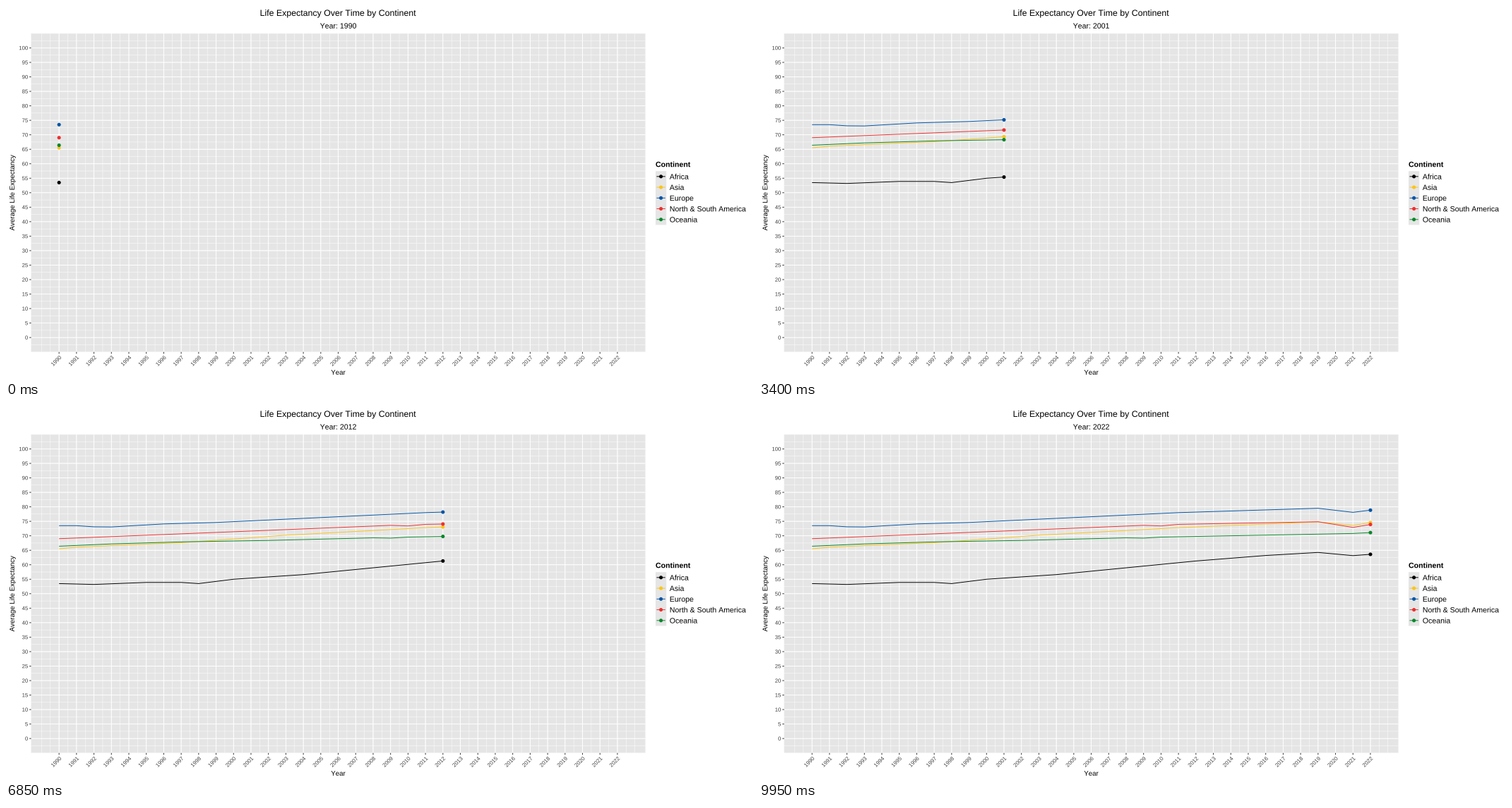
A matplotlib script that plays this animation: 1058x529 px, repeating every 10000 ms.

```python
import numpy as np
import matplotlib.pyplot as plt
from matplotlib.animation import FuncAnimation
from matplotlib.patches import Circle, PathPatch, Rectangle
from matplotlib.textpath import TextPath
from matplotlib.transforms import Affine2D

plt.rcParams["text.kerning_factor"] = 6      # letters keep their plain advance

W, H, DPI = 1058, 529, 64
PX = 72 / DPI                                # points per pixel
FRAMES, INTERVAL = 200, 50
FIRST, SPAN = 1990, 32

LEFT, RIGHT, TOP, BOTTOM = 35.6, 905.5, 38.9, 490.7
MIDDLE = (LEFT + RIGHT) / 2
GRAY = "#E5E5E5"
MAJOR, MINOR, RADIUS = 0.96, 0.47, 2.55
TICK, GAP = 2.42, 1.94
SMALL, AXIS, BODY, TITLE = 7.76, 9.7, 10.58, 12.35

# Turning points of each line: years since the first, life expectancy.
SERIES = {
    "Africa": ("#000000", [
        (0, 53.5), (2, 53.2), (5, 53.9), (7, 53.9), (8, 53.5), (10, 55),
        (14, 56.6), (22, 61.3), (26, 63.2), (29, 64.25), (31, 63.15),
        (32, 63.6)]),
    "Asia": ("#FCC417", [
        (0, 65.5), (1, 66.05), (4, 66.9), (7, 67.6), (13, 70.2), (21, 72.8),
        (29, 74.8), (31, 73.6), (32, 74.55)]),
    "Europe": ("#0054A6", [
        (0, 73.5), (1, 73.5), (2, 73.1), (3, 73.05), (6, 74.1), (9, 74.6),
        (21, 78), (29, 79.5), (31, 78.1), (32, 78.85)]),
    "North & South America": ("#EE2F2F", [
        (0, 69), (10, 71.4), (19, 73.6), (20, 73.4), (21, 73.95),
        (29, 74.85), (31, 72.9), (32, 73.9)]),
    "Oceania": ("#08872B", [
        (0, 66.4), (3, 67.2), (7, 67.9), (12, 68.4), (18, 69.3), (19, 69.2),
        (20, 69.55), (31, 70.8), (32, 71.1)]),
}

fig = plt.figure(figsize=(W / DPI, H / DPI), dpi=DPI, facecolor="white")
ax = fig.add_axes([0, 0, 1, 1])
ax.set(xlim=(0, W), ylim=(H, 0))
ax.axis("off")


def x_at(offset):
    return LEFT + (np.asarray(offset) + 0.05 * SPAN) * (RIGHT - LEFT) / (1.1 * SPAN)


def y_at(value):
    return BOTTOM - (np.asarray(value) + 5) * (BOTTOM - TOP) / 110


def text_path(s, size, weight="normal"):
    return TextPath((0, 0), s, size=size,
                    prop={"family": "Liberation Sans", "weight": weight})


def label(x, y, s, size, align=0, angle=0, color="black", weight="normal"):
    """Put text with its baseline at (x, y); align is 0 left to 1 right."""
    path = text_path(s, size, weight)
    ink = path.get_extents()
    width = 0.556 * size * len(s) if s.isdigit() else ink.x0 + ink.x1
    place = (Affine2D().translate(-align * width, 0).scale(1, -1)
             .rotate_deg(-angle).translate(x, y))
    patch = PathPatch(path, fc=color, lw=0, transform=place + ax.transData)
    return ax.add_artist(patch)


def box(x, y, w, h):
    ax.add_patch(Rectangle((x, y), w, h, fc=GRAY, lw=0, snap=False, zorder=0))


def rules(draw, places, start, end, width, color="white"):
    draw(places, start, end, color=color, lw=width * PX, snap=False, zorder=0.5)


def trace(xs, ys, color):
    return ax.plot(xs, ys, color=color, lw=MAJOR * PX, snap=False,
                   solid_capstyle="butt", zorder=2)[0]


def dot(x, y, color):
    return ax.add_patch(Circle((x, y), RADIUS, fc=color, lw=0, zorder=3))


def draw_panel():
    box(LEFT, TOP, RIGHT - LEFT, BOTTOM - TOP)
    years, values = np.arange(SPAN + 1), np.arange(0, 101, 5)
    xs, ys = x_at(years), y_at(values)

    rules(ax.hlines, y_at(np.arange(-5, 106, 2.5)), LEFT, RIGHT, MINOR)
    rules(ax.vlines, x_at(np.arange(-1, SPAN + 1.5, 0.5)), TOP, BOTTOM, MINOR)
    rules(ax.hlines, ys, LEFT, RIGHT, MAJOR)
    rules(ax.vlines, xs, TOP, BOTTOM, MAJOR)
    rules(ax.hlines, ys, LEFT - TICK, LEFT, MAJOR, "#2B2B2B")
    rules(ax.vlines, xs, BOTTOM, BOTTOM + TICK, MAJOR, "#2B2B2B")

    digit = 0.71 * SMALL
    for value, y in zip(values, ys):
        label(LEFT - TICK - GAP, y + digit / 2, str(value), SMALL, 1,
              color="#444444")
    drop = digit * np.sqrt(0.5)
    for year, x in zip(years, xs):
        label(x + drop, BOTTOM + TICK + GAP + drop, str(FIRST + year), SMALL,
              1, 45, "#444444")

    label(MIDDLE, 14, "Life Expectancy Over Time by Continent", TITLE, 0.5)
    label(MIDDLE, 522.8, "Year", AXIS, 0.5)
    label(11.9, (TOP + BOTTOM) / 2, "Average Life Expectancy", AXIS, 0.5, 90)


def draw_legend():
    x, y, key = 920, 234.2, 15.24
    label(x, 228.2, "Continent", BODY, weight="bold")
    box(x, y, key, key * len(SERIES))
    for row, (name, (color, _)) in enumerate(SERIES.items()):
        mid = y + (row + 0.5) * key
        trace([x + 0.1 * key, x + 0.9 * key], [mid, mid], color)
        dot(x + key / 2, mid, color)
        label(x + key + 4.6, mid + 3.8, name, BODY)


draw_panel()
draw_legend()
subtitle = label(444.7, 31.7, f"Year: {FIRST}", BODY)
lines = [trace([], [], color) for color, _ in SERIES.values()]
heads = [dot(0, 0, color) for color, _ in SERIES.values()]

# Each year is reached on a whole frame, with an even pace in between.
ARRIVALS = np.round(np.arange(SPAN + 1) * (FRAMES - 1) / SPAN)


def update(frame):
    now = np.interp(frame, ARRIVALS, np.arange(SPAN + 1))
    seen = np.append(np.arange(np.ceil(now)), now)
    for line, head, (_, points) in zip(lines, heads, SERIES.values()):
        xs, ys = x_at(seen), y_at(np.interp(seen, *zip(*points)))
        line.set_data(xs, ys)
        head.set_center((xs[-1], ys[-1]))
    year = FIRST + round(SPAN * frame / (FRAMES - 1))
    subtitle.set_path(text_path(f"Year: {year}", BODY))
    return [*lines, *heads, subtitle]


anim = FuncAnimation(fig, update, frames=FRAMES, interval=INTERVAL,
                     repeat=True, repeat_delay=0, blit=False)
plt.show()
```
